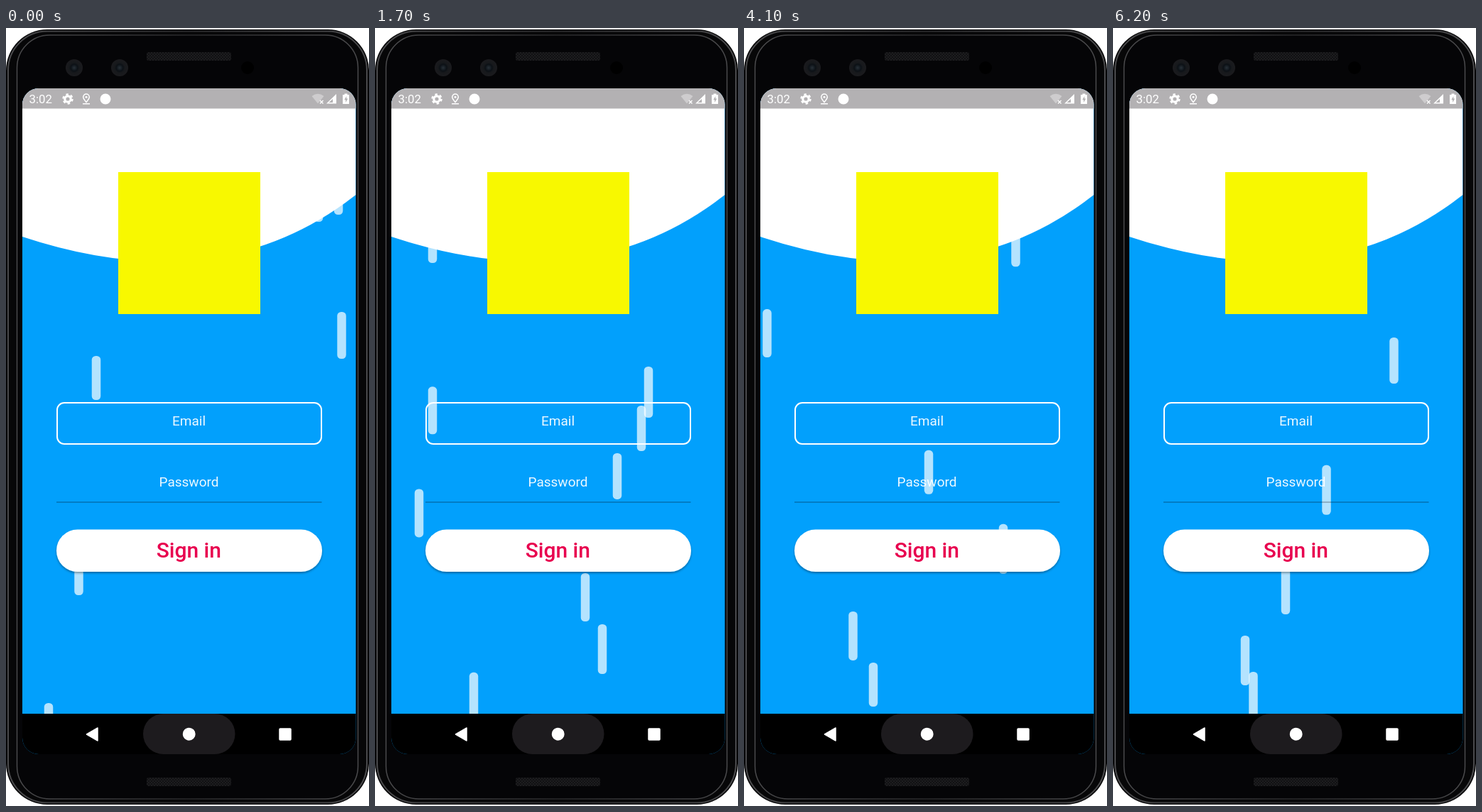
An HTML page that plays this animation: 511x1096 px, repeating every 6.3 s.

```html
<!DOCTYPE html>
<html lang="en">
<head>
<meta charset="utf-8">
<title>Sign in</title>
<style>
  html, body { margin: 0; width: 100%; height: 100%; overflow: hidden; background: #fff; }
  svg { display: block; width: 100%; height: 100%; }
  text { font-family: Roboto, sans-serif; fill: #fff; }
  .label { font-size: 19px; text-anchor: middle; fill-opacity: .93; }
</style>
</head>
<body>
<svg viewBox="0 0 511 1096">
  <defs>
    <clipPath id="screen"><rect x="23" y="85" width="469.5" height="938" rx="23"/></clipPath>
    <linearGradient id="rim">
      <stop offset="0" stop-color="#4a4a4c"/>
      <stop offset=".5" stop-color="#29292b"/>
      <stop offset="1" stop-color="#4a4a4c"/>
    </linearGradient>
    <radialGradient id="lens">
      <stop offset="0" stop-color="#273038"/>
      <stop offset=".4" stop-color="#0c1116"/>
      <stop offset=".6" stop-color="#17191c"/>
      <stop offset="1" stop-color="#1b1b1e"/>
    </radialGradient>
    <pattern id="mesh" width="4" height="4" patternUnits="userSpaceOnUse">
      <rect width="4" height="4" fill="#1d1d1f"/>
      <path d="M0 0h2v2h-2zM2 2h2v2h-2z" fill="#111113"/>
    </pattern>
    <filter id="shadow" x="-5%" y="-20%" width="110%" height="150%">
      <feDropShadow dx="0" dy="2" stdDeviation="1.5" flood-opacity=".35"/>
    </filter>
  </defs>

  <!-- phone body -->
  <rect x="0" y="2" width="511" height="1092" rx="58" fill="#070708"/>
  <rect x="3" y="4.5" width="505" height="1087" rx="55" fill="none" stroke="url(#rim)" stroke-width="2"/>
  <rect x="15.5" y="10" width="480" height="1076" rx="46" fill="#050507" stroke="url(#rim)" stroke-width="1.5"/>
  <rect x="198" y="34" width="119" height="12" rx="3" fill="url(#mesh)"/>
  <rect x="198" y="1056" width="119" height="12" rx="3" fill="url(#mesh)"/>
  <circle cx="96" cy="56" r="12" fill="url(#lens)"/>
  <circle cx="160" cy="56" r="12" fill="url(#lens)"/>
  <circle cx="340" cy="56" r="9"/>

  <g clip-path="url(#screen)">
    <rect x="23" y="85" width="470" height="939" fill="#02a0fc"/>
    <g id="bars" fill="#fff" fill-opacity=".7"></g>
    <path d="M23 85V294Q300 386 492.5 235V85z" fill="#fff"/>
    <rect x="158" y="203" width="200" height="200" fill="#f8f800"/>

    <!-- form -->
    <rect x="72" y="528" width="372" height="58" rx="10" fill="none" stroke="#fff" stroke-width="2"/>
    <text class="label" x="257.5" y="559.5">Email</text>
    <text class="label" x="257.5" y="646">Password</text>
    <path d="M71 668H444.5" stroke="#000" stroke-opacity=".45"/>
    <rect x="71" y="706.5" width="374" height="59.5" rx="29.7" fill="#fff" filter="url(#shadow)"/>
    <text x="257.3" y="746" font-size="30" font-weight="500" text-anchor="middle" style="fill:#e8004f">Sign in</text>

    <!-- status bar -->
    <rect x="23" y="85" width="470" height="28.5" fill="#b3b1b3"/>
    <text x="32.5" y="106" font-size="16.8">3:02</text>
    <g fill="none" stroke="#fff">
      <circle cx="87" cy="100" r="4.2" stroke-width="3.2"/>
      <circle cx="87" cy="100" r="6.5" stroke-width="2.4" stroke-dasharray="3.4 3.4"/>
      <path d="M113 104.5C110 101 108.7 99.500 108.700 97.300A4.300 4.300 0 0 1 117.300 97.300C117.300 99.500 116 101 113 104.500zM108 106.700H118" stroke-width="1.5"/>
    </g>
    <g fill="#fff">
      <circle cx="113" cy="97.300" r="1.500"/>
      <circle cx="140" cy="100" r="7.500"/>
      <path d="M430.500 96Q439 89.500 447.500 96L439 106.500z" fill-opacity=".35"/>
      <path d="M442 102l4.500 4.500m0-4.500l-4.500 4.500" stroke="#fff" stroke-width="1.400"/>
      <path d="M451 106.500L465 93V106.500zM460 100L454.500 105H460z" fill-rule="evenodd"/>
      <path d="M476.500 92.500h4v1.500h2.500v13h-9v-13h2.500zM479.300 96l-3 5.200h1.900v3.800l3-5.500h-1.900z" fill-rule="evenodd"/>
    </g>

    <!-- navigation bar -->
    <rect x="23" y="966" width="470" height="58"/>
    <rect x="193" y="966" width="129.5" height="57" rx="28.500" fill="#1d1b1e"/>
    <g fill="#fff" stroke="#fff" stroke-width="1.500" stroke-linejoin="round">
      <path d="M113.500 995L129 986V1004z"/>
      <circle cx="257.700" cy="994.700" r="8.200"/>
      <rect x="385" y="987" width="16" height="16" rx="1"/>
    </g>
  </g>
</svg>
<script>
const LOOP = 6300, STEP = 100, WIDTH = 12.5;
// centre x, top at time zero, height, rise in px per second
const bars = [
  [468, 197, 66, 400], [440, 207, 66, 400], [472.5, 400, 66, 400], [127, 462, 62, 400],
  [102.5, 733, 66, 358], [60, 951, 67, 474.5], [81, 1034, 62, 450], [81, 1244, 67, 434.5],
  [385, 1038, 72, 330], [375, 1161, 64, 370], [341, 1251, 65, 383.6], [62, 1360, 68, 418],
  [296, 1448, 68, 400], [320, 1571, 70, 430], [139, 1615, 72, 416], [382.5, 2061, 67, 437],
  [32.5, 2073, 68, 409], [260, 1874, 62, 312], [365, 2099, 70, 341.5], [153.5, 2507, 69, 411],
  [182, 2739, 62, 450], [395.5, 2358, 65, 310], [300.5, 2575, 70, 316], [243, 3116, 66, 380],
  [186, 3212, 70, 380], [197.5, 3387, 68, 400]
].map(([x, top, height, speed]) => {
  const rect = document.createElementNS("http://www.w3.org/2000/svg", "rect");
  const attrs = { x: x - WIDTH / 2, y: top, width: WIDTH, height, rx: 5.5 };
  for (const name in attrs) rect.setAttribute(name, attrs[name]);
  document.getElementById("bars").append(rect);
  return { rect, top, speed };
});

function draw(now) {
  const t = Math.floor(now % LOOP / STEP) * STEP / 1000;
  for (const { rect, top, speed } of bars) rect.setAttribute("y", top - speed * t);
  requestAnimationFrame(draw);
}
draw(performance.now());
</script>
</body>
</html>
```
